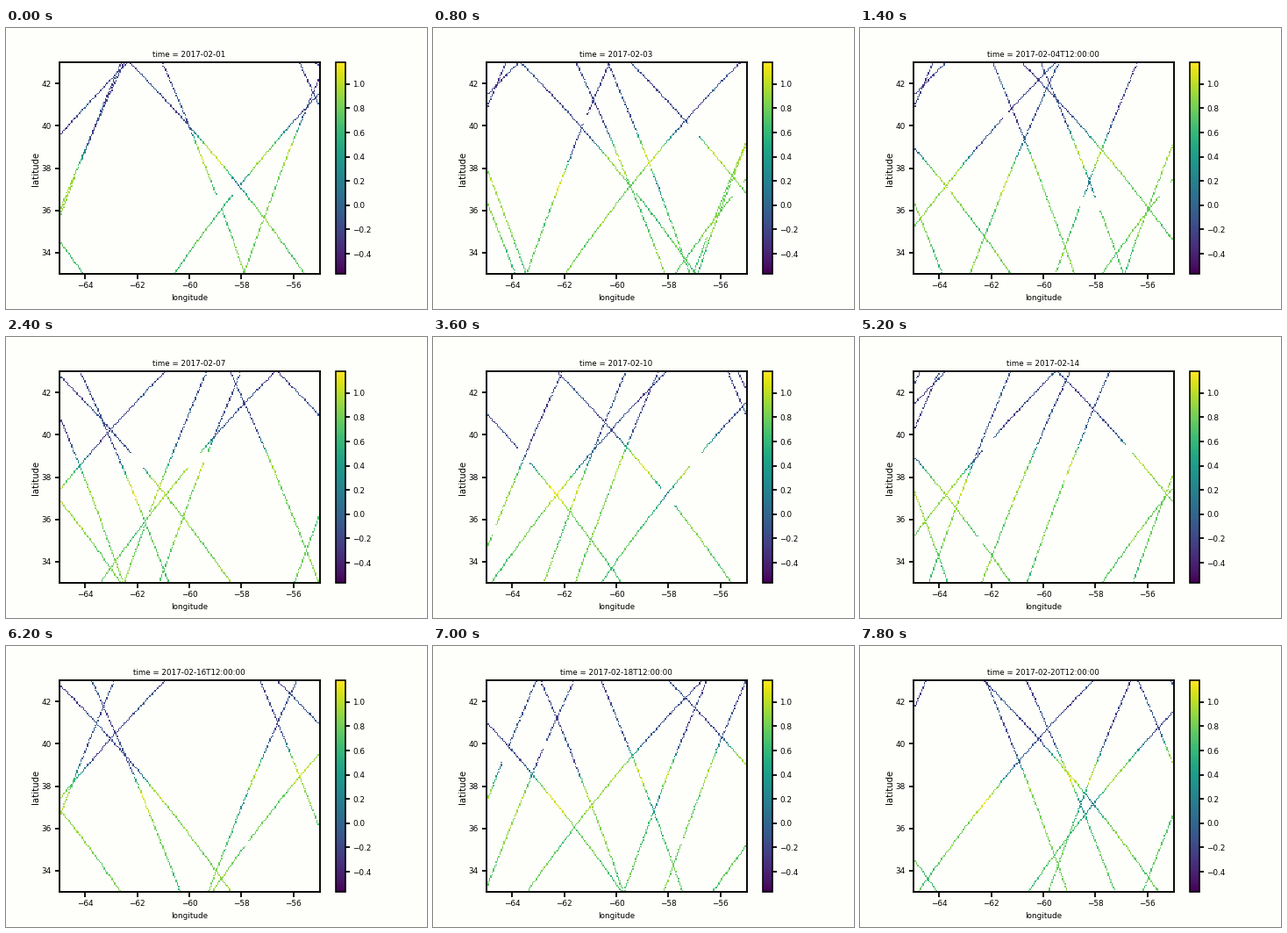
Recreate the animation shown at these times as a matplotlib script. Size 480 by 320 pixels, loop 8 s.

```python
import numpy as np
import matplotlib.pyplot as plt
from matplotlib.animation import FuncAnimation

W, H, DPI = 480, 320, 80
PT = 72 / DPI                      # points per pixel
FRAMES, STEP_MS = 40, 200
LON0, LON1, LAT0, LAT1 = -65, -55, 33, 43
CELLS = 200
FLATTEN = 0.99331                  # geodetic to geocentric latitude
PAPER = "#fefefb"

plt.rcParams.update({
    "font.family": "DejaVu Sans",
    "font.size": 8.9 * PT,
    "axes.linewidth": 1.9 * PT,
})

# inclination, westward shift per revolution (deg), period (days),
# longitude and day of one northbound crossing of latitude 33
SATS = [
    (66.04, 3600 / 127, 9.9156 / 127, -60.6, -0.15),
    (66.04, 3600 / 127, 9.9156 / 127, -67.65, 5.85),
    (98.65, 9720 / 385, 27 / 385, -62.55, 6.07),
    (98.55, 25.154, 25.154 / 360, -58.82, 4.02),
    (99.34, 26.1255, 26.1255 / 360, -63.9, 2.52),
]


def ground_track(u, inc, shift):
    """Latitude and longitude east of the node for orbit angle u (degrees)."""
    a, i = np.radians(u), np.radians(inc)
    centric = np.arcsin(np.sin(i) * np.sin(a))
    lat = np.degrees(np.arctan(np.tan(centric) / FLATTEN))
    lon = np.degrees(np.arctan2(np.cos(i) * np.sin(a), np.cos(a)))
    return lat, lon - shift * u / 360


def orbit_angle(lat, inc):
    centric = np.arctan(FLATTEN * np.tan(np.radians(lat)))
    return np.degrees(np.arcsin(np.sin(centric) / np.sin(np.radians(inc))))


def sea_level(lon, lat, day):
    """Low water north of a meandering front, high water south of it."""
    front = 39.15 + 0.22 * (lon + 60) + 0.4 * np.sin(1.25 * (lon + 60.6))
    d = front - lat
    north = -0.17 + 0.13 * np.sin(2.3 * lon + 1.1 * lat) * np.cos(1.9 * lat - lon)
    south = (0.77 + 0.25 * np.exp(-((d - 1.2) / 0.9) ** 2)
             + 0.13 * np.sin(1.7 * lon + 0.6) * np.cos(1.5 * lat))
    eddy = 0.75 * np.exp(-((lon + 58.25) ** 2 + (lat - 37.3) ** 2) / 0.5)
    ripple = 0.04 * np.sin(9 * lat + 5 * day)
    return north + (south - north) / (1 + np.exp(-4.5 * d)) - eddy + ripple


def to_cell(x, lo, hi):
    return ((x - lo) / (hi - lo) * CELLS).astype(int)


def build_passes():
    rng = np.random.default_rng(7)
    passes = []
    for inc, shift, period, lon_ref, day_ref in SATS:
        ua, ub = orbit_angle(LAT0, inc), orbit_angle(LAT1, inc)
        node = lon_ref - ground_track(ua, inc, shift)[1]
        du = 360 / (period * 86400)          # one sample per second
        first = int((-1.3 - day_ref) / period)
        last = int((21 - day_ref) / period)
        for n in range(first, last + 1):
            for lo, hi in ((ua, ub), (180 - ub, 180 - ua)):
                u = np.arange(lo + du * rng.random(), hi, du)
                lat, lon = ground_track(u, inc, shift)
                lon = (lon + node - shift * n + 240) % 360 - 240
                inside = (lon > LON0) & (lon < LON1) & (lat > LAT0) & (lat < LAT1)
                if not inside.any():
                    continue
                # some passes lose a short stretch of data
                hole = rng.uniform(35, 41)
                size = rng.uniform(0.1, 0.4) * (rng.random() < 0.4)
                inside &= abs(lat - hole) >= size
                lon, lat = lon[inside], lat[inside]
                day = day_ref + (n + ((lo + hi) / 2 - ua) / 360) * period
                value = sea_level(lon, lat, day) + rng.normal(0, 0.035, lon.size)
                passes.append((day, to_cell(lat, LAT0, LAT1),
                               to_cell(lon, LON0, LON1), value))
    return sorted(passes, key=lambda p: p[0])


PASSES = build_passes()


def field(day):
    """Grid of all passes within one day of the given time."""
    grid = np.full((CELLS, CELLS), np.nan)
    for when, row, col, value in PASSES:
        if abs(when - day) <= 1:
            grid[row, col] = value
    return np.ma.masked_invalid(grid)


def box(left, top, right, bottom):
    return [left / W, 1 - bottom / H, (right - left) / W, (bottom - top) / H]


def label(x, y, text, px, **kw):
    return fig.text(x / W, 1 - y / H, text, fontsize=px * PT,
                    ha="center", va="center", **kw)


fig = plt.figure(figsize=(W / DPI, H / DPI), dpi=DPI, facecolor=PAPER)
ax = fig.add_axes(box(60.5, 39, 357.5, 280), facecolor=PAPER)
im = ax.imshow(field(0), origin="lower", aspect="auto", interpolation="nearest",
               extent=(LON0, LON1, LAT0, LAT1), cmap="viridis",
               vmin=-0.566, vmax=1.18)
ax.set_xticks(range(-64, -55, 2))
ax.set_yticks(range(34, 43, 2))
ax.tick_params(length=5.5 * PT, width=1.8 * PT, pad=3.5 * PT)

cax = fig.add_axes(box(376, 39, 387, 280))
bar = fig.colorbar(im, cax=cax, ticks=np.arange(-2, 6) / 5)
bar.outline.set_linewidth(1.6 * PT)
cax.tick_params(length=5 * PT, width=1.8 * PT, pad=3.5 * PT)

title = label(209, 30.5, "", 8.75)
label(209, 307, "longitude", 8.9)
label(34.5, 160.5, "latitude", 10.1, rotation=90)


def draw(k):
    im.set_data(field(k / 2))
    noon = "T12:00:00" if k % 2 else ""
    title.set_text(f"time = 2017-02-{1 + k // 2:02d}{noon}")
    return im, title


anim = FuncAnimation(fig, draw, frames=FRAMES, interval=STEP_MS,
                     init_func=lambda: draw(0), repeat=True, repeat_delay=0)
plt.show()
```
